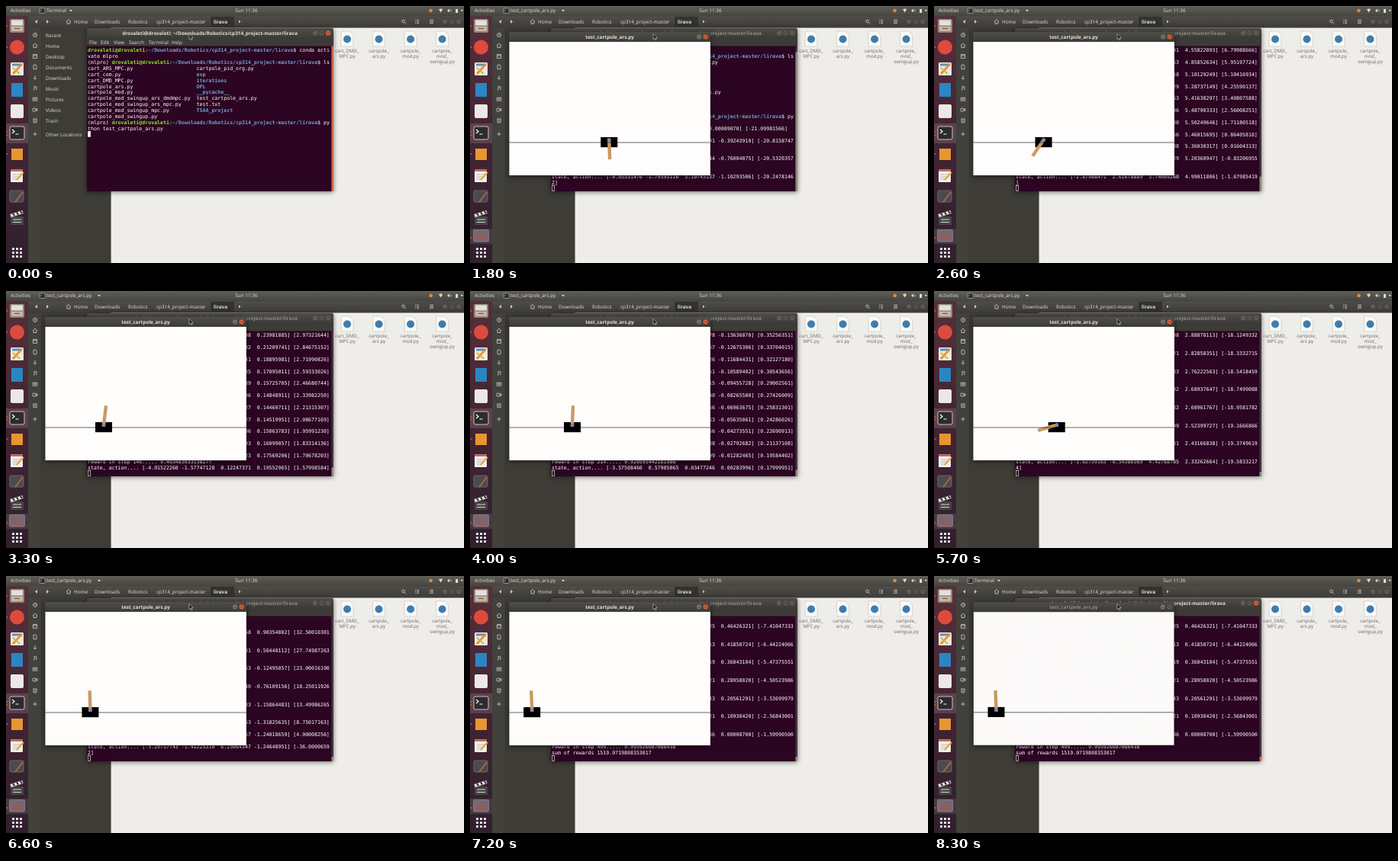
Recreate the animation shown at these times as an HTML page. Size 600x337 px, loop 8.4 s.

```html
<!DOCTYPE html>
<html lang="en">
<head>
<meta charset="utf-8">
<title>Cart-pole desktop</title>
<style>
  html, body { margin: 0; width: 100%; height: 100%; overflow: hidden; background: #efedea; }
  svg { display: block; width: 100vw; height: 100vh; }
  text { font: 6.4px "Open Sans", "Noto Sans", sans-serif; fill: #e4e0d8; text-rendering: geometricPrecision; white-space: pre; }
  .mid { text-anchor: middle; }
  .bold { font-weight: 700; }
  .label { fill: #6a6763; font-size: 6.2px; text-anchor: middle; }
  .line { fill: none; stroke: #d5d1c8; stroke-width: .8; }
  .frame { fill: #3c3b37; filter: drop-shadow(0 1px 3px rgba(0, 0, 0, .55)); }
  #rows text { font: 6.58px "DejaVu Sans Mono", monospace; fill: #fff; }
  #rows .u { font-weight: 700; fill: #8ae234; }
  #rows .d { font-weight: 700; fill: #729fcf; }
  .close { fill: #e9613a; }
  .thumb { fill: #cb6a4a; }
  .blur .title { fill: #908d84; }
  .blur .close { fill: #66635c; }
  .blur .thumb { fill: #8d8a84; }
</style>
</head>
<body>
<svg id="stage" viewBox="0 0 600 337" preserveAspectRatio="none">
  <defs>
    <linearGradient id="dockFill" x2="0" y2="1">
      <stop offset="0" stop-color="#55303a"/><stop offset=".5" stop-color="#432434"/><stop offset="1" stop-color="#30202d"/>
    </linearGradient>
    <linearGradient id="bar" x2="0" y2="1">
      <stop offset="0" stop-color="#504e48"/><stop offset="1" stop-color="#3c3b37"/>
    </linearGradient>
    <linearGradient id="panel" x2="0" y2="1">
      <stop offset="0" stop-color="#605e56"/><stop offset="1" stop-color="#454440"/>
    </linearGradient>
  </defs>

  <!-- file manager -->
  <rect x="29" y="28" width="109" height="309" fill="#3d3c37"/>
  <rect x="29" y="28" width="17.5" height="309" fill="#42413b"/>
  <path d="M46.5 28V337" stroke="#34332f" stroke-width=".7"/>
  <rect x="137.600" y="28" width="463" height="309" fill="#efedea"/>
  <rect x="29" y="13" width="571" height="15.600" fill="url(#bar)"/>
  <rect x="268" y="14" width="31" height="13.500" fill="#33322e"/>
  <g class="line">
    <path d="M79 20.500l3-2.800 3 2.800M80 20v3.200h4V20"/>
    <circle cx="520.500" cy="20" r="1.800"/><path d="M522 21.500l2 2M536 18.500h1M538 18.500h3M536 20.500h1M538 20.500h3M536 22.500h1M538 22.500h3M555 18.500h5M555 20.500h5M555 22.500h5"/>
  </g>
  <path d="M41 18v5l-3-2.500zM53 18v5l3-2.500zM305 18.500v4l2.500-2z" fill="#cfcbc2"/>
  <g fill="#66635c" stroke="#2f2e2a" stroke-width=".6"><circle cx="575" cy="20.500" r="3.400"/><circle cx="584" cy="20.500" r="3.400"/><circle cx="593" cy="20.500" r="3.400"/></g>
  <path d="M573.500 21h3M582.700 19.200h2.600v2.600h-2.600zM591.800 19.300l2.400 2.400m0-2.400l-2.400 2.400" fill="none" stroke="#33322e" stroke-width=".7"/>
  <g id="crumbs"></g>
  <g id="places"></g>
  <g id="files"></g>

  <!-- terminal -->
  <g id="term">
    <path class="frame" d="M106 243V32q0-3 3-3H426q3 0 3 3V243z"/>
    <path d="M106 42V32q0-3 3-3H426q3 0 3 3V42z" fill="url(#bar)"/>
    <text class="bold mid title" x="267" y="37.900" id="termTitle"></text>
    <g stroke="#2f2e2a" stroke-width=".5"><circle cx="405" cy="35.500" r="3.500" fill="#66635c"/><circle cx="413.500" cy="35.500" r="3.500" fill="#66635c"/><circle class="close" cx="422" cy="35.500" r="3.500"/></g>
    <path d="M403.500 36h3M412.200 34.200h2.600v2.600h-2.600zM420.800 34.300l2.400 2.400m0-2.400l-2.400 2.400" fill="none" stroke="#2f2e2a" stroke-width=".7"/>
    <g id="menu"></g>
    <rect x="106" y="52.500" width="323" height="190.500" fill="#2c0522"/>
    <rect x="426.500" y="52.500" width="2.500" height="190.500" fill="#46373f"/>
    <rect class="thumb" id="thumb" x="426.500" width="2.500"/>
    <g id="rows"></g>
    <rect id="caret" x="107.300" width="3.400" height="7" stroke="#fff" stroke-width=".6"/>
  </g>

  <!-- simulation window -->
  <g id="sim">
    <path class="frame" d="M51 222.500V37q0-3 3-3H312q3 0 3 3V222.500z"/>
    <path d="M51 47V37q0-3 3-3H312q3 0 3 3V47z" fill="url(#bar)"/>
    <text class="bold mid title" x="183" y="42.800">test_cartpole_ars.py</text>
    <g stroke="#2f2e2a" stroke-width=".5"><circle cx="300" cy="40.500" r="3.400" fill="#7b776e"/><circle class="close" cx="308.600" cy="40.500" r="3.400"/></g>
    <path d="M298.500 41h3M307.400 39.300l2.400 2.400m0-2.400l-2.400 2.400" stroke="#2f2e2a" stroke-width=".7"/>
    <rect x="51.500" y="47" width="263.300" height="175" fill="#fefdfc"/>
    <g id="cart">
      <rect x="-11" y="172" width="22" height="13.200"/>
      <g transform="translate(0 175.700)">
        <rect id="pole" x="-2.200" y="-25.500" width="4.400" height="27.700" fill="#cc9966"/>
        <circle r="2.200" fill="#8080cc"/>
      </g>
    </g>
    <path d="M51.500 179H314.800" stroke="#000" stroke-width=".6"/>
  </g>

  <!-- dock -->
  <rect y="13" width="29" height="324" fill="url(#dockFill)"/>
  <rect y="154" width="29" height="26" fill="#fff" opacity=".13"/>
  <g fill="#e95420"><circle cx="1.500" cy="26" r="1"/><circle cx="1.500" cy="54" r="1"/><circle cx="1.500" cy="165" r="1"/><circle cx="1.500" cy="169" r="1"/><circle cx="1.500" cy="194" r="1"/></g>
  <rect x="5" y="17" width="19" height="18" rx="2" fill="#95857a"/><rect x="7" y="18.500" width="15" height="7" fill="#e4e0da"/><rect x="7" y="27" width="15" height="6" fill="#c9b8aa"/><path d="M11 29.500h7" stroke="#7a5c4a" stroke-width="1.300"/>
  <circle cx="14.500" cy="54" r="9.500" fill="#dd4b3e"/>
  <rect x="6" y="74" width="17" height="17" rx="1.500" fill="#eee9df"/><path d="M8 77h13" stroke="#5d8fc4" stroke-width="3"/><path d="M9 89L21 76" stroke="#e9922e" stroke-width="2.600"/><path d="M9 81l9 8" stroke="#d7b640" stroke-width="2"/>
  <rect x="7" y="101" width="15" height="18" fill="#2b86c4"/>
  <rect x="6" y="129" width="17" height="18" rx="2" fill="#ece8e6"/>
  <rect x="5" y="158" width="19" height="17" rx="2" fill="#2d2b2c" stroke="#c9c5c0"/><path d="M8 162l3 2.500-3 2.500M12.500 168h4" fill="none" stroke="#fff" stroke-width="1.200"/>
  <rect x="7" y="187" width="15" height="15" fill="#e8962f"/>
  <rect x="6" y="214" width="16" height="17" rx="1" fill="#f1efea"/><path d="M6 215.500h16" stroke="#b8564a" stroke-width="2.500"/><path d="M9 221h10M9 224h10M9 227h6" stroke="#aaa" stroke-width=".8"/><path d="M14 228l9-10" stroke="#e7a13a" stroke-width="2"/>
  <rect x="5" y="242" width="18" height="15" rx="2" fill="#4c4a4b" stroke="#6a6768"/><path d="M12 257l10-13" stroke="#9a7052" stroke-width="1.800"/>
  <rect x="6" y="276" width="17" height="11" rx="1" fill="#454545"/><path d="M6 275l16-5" stroke="#ddd" stroke-width="4"/><path d="M9 272l2 3M14 270.500l2 3M19 269l2 3" stroke="#222" stroke-width="1.800"/><path d="M9 280h11M9 283.500h11" stroke="#d8d8d8" stroke-width="1.200"/>
  <g id="task">
    <rect y="292" width="29" height="20" fill="#fff" opacity=".1"/><circle cx="1.500" cy="304" r="1" fill="#e95420"/>
    <rect x="4.500" y="293.500" width="20" height="15.500" rx="1.500" fill="#77686f" stroke="#958a8f" stroke-width=".7"/><path d="M8 304h13" stroke="#a3554d" stroke-width="3"/>
  </g>
  <g id="grid" fill="#eee"></g>

  <!-- top bar -->
  <rect width="600" height="13.500" fill="url(#panel)"/>
  <text x="6" y="8.400">Activities</text>
  <rect x="44" y="3" width="7" height="6.500" rx="1" fill="#2a2829" stroke="#bbb" stroke-width=".7"/><path d="M45.500 5l1.300 1-1.300 1" fill="none" stroke="#eee" stroke-width=".6"/>
  <text x="53" y="8.400" id="app"></text>
  <path id="drop" d="M-2 5h4l-2 2.600z" fill="#dfdbd2"/>
  <text class="mid" x="315" y="8.400">Sun 11:36</text>
  <circle cx="556.500" cy="6" r="2.300" fill="#e8893a"/>
  <path d="M567 4.500q2.500-2 5 0l-2.500 4z" fill="#dfdbd2"/>
  <path d="M578.500 5h1l1.500-1.500v5l-1.500-1.500h-1zM589 4h3v5h-3zM595.500 5h3.400l-1.700 2.200z" fill="#dfdbd2"/>
  <path d="M582.500 4.500q1.300 1.500 0 3" class="line"/>

  <path d="M240 36.500v7.200l1.700-1.500 1.200 2.600 1.200-.6-1.200-2.500h2.300z" fill="#111" stroke="#fff" stroke-width=".5"/>
</svg>
<script>
const $ = id => document.getElementById(id);
const LOOP = 8400, DT = .02, LAST = 499, ROWS = 24, ROW_H = 7.88, TAU = Math.PI * 2;
const user = 'drovaleti', folder = 'lirava';
const path = '~/Downloads/Robotics/cp314_project-master/' + folder;

const label = (x, y, s, cls = '') => `<text x="${x}" y="${y}" class="${cls}">${s}</text>`;

// Static parts
$('termTitle').textContent = `${user}@${user}: ${path}`;
$('crumbs').innerHTML = [[89, 'Home'], [116, 'Downloads'], [160, 'Robotics'], [197, 'cp314_project-master']]
  .map(([x, s]) => label(x, 22.8, s)).join('') + label(272, 22.8, folder, 'bold');
$('menu').innerHTML = [[109, 'File'], [124, 'Edit'], [141, 'View'], [161, 'Search'], [187, 'Terminal'], [217, 'Help']]
  .map(([x, s]) => label(x, 50.1, s)).join('');

const places = {
  Recent: 'M-2.5 0a2.500 2.500 0 1 0 5 0a2.500 2.500 0 1 0-5 0M0-1.500V0H1.500',
  Home: 'M-3 0L0-2.800 3 0M-2-.5V2.500H2V-.5',
  Desktop: 'M-2.500-2.500h5v5h-5zM-2.500-1h5',
  Documents: 'M-2-2.800H1L2-1.800V2.800H-2z',
  Downloads: 'M0-3V2M-2 0L0 2.200 2 0',
  Music: 'M-1 2V-2.500L2-2V1.500M-2 2h1M1 1.700h1',
  Pictures: 'M-2.800-1.800h5.600v4h-5.600zM-1 0a1 1 0 1 0 2 0a1 1 0 1 0-2 0',
  Videos: 'M-2.800-1.800h3.800v3.800h-3.800zM1 0l2-1.500v3z',
  Trash: 'M-2.500-2h5M-2-2V2.800H2V-2M0-.8V1.500',
  'Other Locations': 'M0-2.500V2.500M-2.500 0H2.500'
};
$('places').innerHTML = Object.entries(places).map(([name, d], i) => {
  const y = i < 9 ? 38 + 14 * i : 168;
  return `<path class="line" d="${d}" transform="translate(38 ${y})"/>` + label(52, y + 2.5, name);
}).join('');

$('files').innerHTML = ['cart_DMD_ MPC.py', 'cartpole_ ars.py', 'cartpole_ mod.py', 'cartpole_ mod_ swingup.py']
  .map((name, i) => {
    const x = 447 + 41.5 * i;
    return `<path d="M${x - 8} 33h11l5 5v15h-16z" fill="#f8f8f7" stroke="#c4c1bb" stroke-width=".6"/>` +
      `<circle cx="${x}" cy="43.500" r="5" fill="#3f7cac"/>` +
      name.split(' ').map((s, j) => label(x, 60.6 + 7.2 * j, s, 'label')).join('');
  }).join('');

$('grid').innerHTML = Array.from({ length: 9 }, (_, i) =>
  `<rect x="${8 + i % 3 * 5}" y="${317 + Math.floor(i / 3) * 5}" width="3" height="3" rx=".8"/>`).join('');

$('rows').innerHTML = Array.from({ length: ROWS }, (_, i) => label(107, 60.3 + ROW_H * i, '')).join('');
const rowNodes = [...$('rows').children];

// Key poses: step, cart position, pole angle, action
const keys = [
  [0, 0, Math.PI, -21.1],
  [25, -2.3, 1.9, -14],
  [40, -4.2, 1.2, 20],
  [70, -3.45, 2.69, 6.8],
  [80, -2.88, 3.74, -1.68],
  [95, -2.2, 5.12, -15],
  [120, -2.9, 6.15, 5],
  [150, -4.1, 6.42, 1.2],
  [215, -3.575, 6.318, .18],
  [285, -2.5, 6.445, .45],
  [301, -2.193, 6.628, .98],
  [320, -1.85, 7.1, 2],
  [356, -1.5, 9.42, -15],
  [380, -1.65, 10.8, -20],
  [410, -2.2, 11.5, -12],
  [445, -3.9, 12.2, 38],
  [456, -4.75, 12.58, 42],
  [460, -5.03, 12.64, 23],
  [464, -5.27, 12.56, 4],
  [465, -5.297, 12.534, -36],
  [480, -6, 12.4, -20],
  [499, -7.43, 12.526, -1.6]
];

// Rate at a key from its two neighbours; at rest at both ends
function slope(i, col) {
  if (!keys[i - 1] || !keys[i + 1]) return 0;
  const [a, b, c] = keys.slice(i - 1, i + 2), h = b[0] - a[0], k = c[0] - b[0];
  return ((b[col] - a[col]) / h * k + (c[col] - b[col]) / k * h) / (h + k) / DT;
}

// Cubic Hermite value and rate on the stretch that ends at key i
function curve(i, n, col) {
  const a = keys[i - 1], b = keys[i], h = (b[0] - a[0]) * DT, u = (n - a[0]) / (b[0] - a[0]);
  const m = slope(i - 1, col) * h, k = slope(i, col) * h, rise = b[col] - a[col];
  const c2 = 3 * rise - 2 * m - k, c3 = m + k - 2 * rise;
  return [a[col] + u * (m + u * (c2 + u * c3)), (m + u * (2 * c2 + 3 * u * c3)) / h];
}
const segment = n => Math.max(1, keys.findIndex(k => k[0] >= n));
const state = n => [1, 2].flatMap(col => curve(segment(n), n, col));
function action(n) {
  const i = segment(n), a = keys[i - 1], b = keys[i];
  return a[3] + (b[3] - a[3]) * (n - a[0]) / (b[0] - a[0]);
}

// Terminal log
const jitter = seed => (Math.sin(seed * 12.9898) * 43758.5453 % 1) * 2e-4;
function stateLine(n) {
  const s = state(n);
  s[2] %= TAU;
  const [act, ...cells] = [action(n), ...s].map((v, i) => (v + jitter(5 * n + i + 1)).toFixed(8));
  const width = cells.some(c => c[0] === '-') ? 11 : 10;
  return `state, action.... [${cells.map(c => c.padStart(width)).join(' ')}] [${act}]`;
}
function rewardLine(n) {
  const [, speed, angle] = state(n);
  return `reward in step ${n}..... ${(5 + 5 * Math.cos(angle) - .2 * speed * speed).toFixed(15)}`;
}

const dir = s => `<tspan class="d">${s}</tspan>`;
const prompt = cmd => `<tspan class="u">${user}@${user}</tspan>:${dir(path)}$ ${cmd}`;
const pair = (a, b) => a.padEnd(36) + b;
const log = [
  prompt('conda acti'), 'vate mlpro', '(mlpro) ' + prompt('ls'),
  pair('cart_ARS_MPC.py', 'cartpole_pid_org.py'),
  pair('cart_cem.py', dir('exp')),
  pair('cart_DMD_MPC.py', dir('iterations')),
  pair('cartpole_ars.py', dir('OPL')),
  pair('cartpole_mod.py', dir('__pycache__')),
  pair('cartpole_mod_swingup_ars_dmdmpc.py', 'test_cartpole_ars.py'),
  pair('cartpole_mod_swingup_ars_mpc.py', 'test.txt'),
  pair('cartpole_mod_swingup_mpc.py', dir('TSAA_project')),
  'cartpole_mod_swingup.py', '(mlpro) ' + prompt('py'), 'thon test_cartpole_ars.py'
];
const start = log.length, ends = [];
for (let n = 0; n <= LAST; n++) {
  log.push(...stateLine(n).match(/.{1,80}/g));
  ends.push(log.length);
  log.push(rewardLine(n));
}
log.push('sum of rewards 1519.0719808353017');

function showLog(end) {
  const top = Math.max(0, end - ROWS + 1);
  rowNodes.forEach((node, i) => node.innerHTML = top + i < end ? log[top + i] : '');
  $('caret').setAttribute('y', 54 + ROW_H * (end - top));
  const size = top ? Math.max(6, 190.5 * ROWS / (end + 1)) : 190.5;
  $('thumb').setAttribute('y', 243 - size);
  $('thumb').setAttribute('height', size);
}

const show = (id, on) => $(id).style.display = on ? '' : 'none';

function draw(t) {
  // The screen freezes twice while the simulation runs on
  if (t >= 4200 && t < 4500) t = 4200;
  if (t >= 5800 && t < 6300) t = 5800;
  const step = Math.min(LAST, Math.floor((t - 1763) * .0962));
  showLog(t >= 7200 ? log.length : step < 0 ? start : ends[step]);

  const [x, , angle] = state(Math.max(0, step));
  $('cart').setAttribute('transform', `translate(${183 + 13.7 * x} 0)`);
  $('pole').setAttribute('transform', `rotate(${angle * 360 / TAU})`);

  const closing = t >= 8300, opening = t < 1600, active = !opening && !closing;
  show('sim', t >= 1300);
  $('sim').setAttribute('class', closing ? 'blur' : '');
  $('sim').setAttribute('opacity', closing ? .99 : opening ? .85 : 1);
  $('sim').setAttribute('transform', closing ? 'translate(183 128) scale(.997) translate(-183 -128)' : '');
  show('task', !opening);
  $('term').setAttribute('class', active ? 'blur' : '');
  $('app').textContent = active ? 'test_cartpole_ars.py' : 'Terminal';
  $('drop').setAttribute('transform', `translate(${active ? 122 : 85} 0)`);
  $('caret').setAttribute('fill', t < 200 ? '#fff' : 'none');
  show('caret', t < 200 || !opening);
}

let shown = -1;
const begin = performance.now();
function tick() {
  const t = Math.floor((performance.now() - begin) % LOOP / 100) * 100;
  if (t !== shown) draw(shown = t);
  requestAnimationFrame(tick);
}
tick();
</script>
</body>
</html>
```
